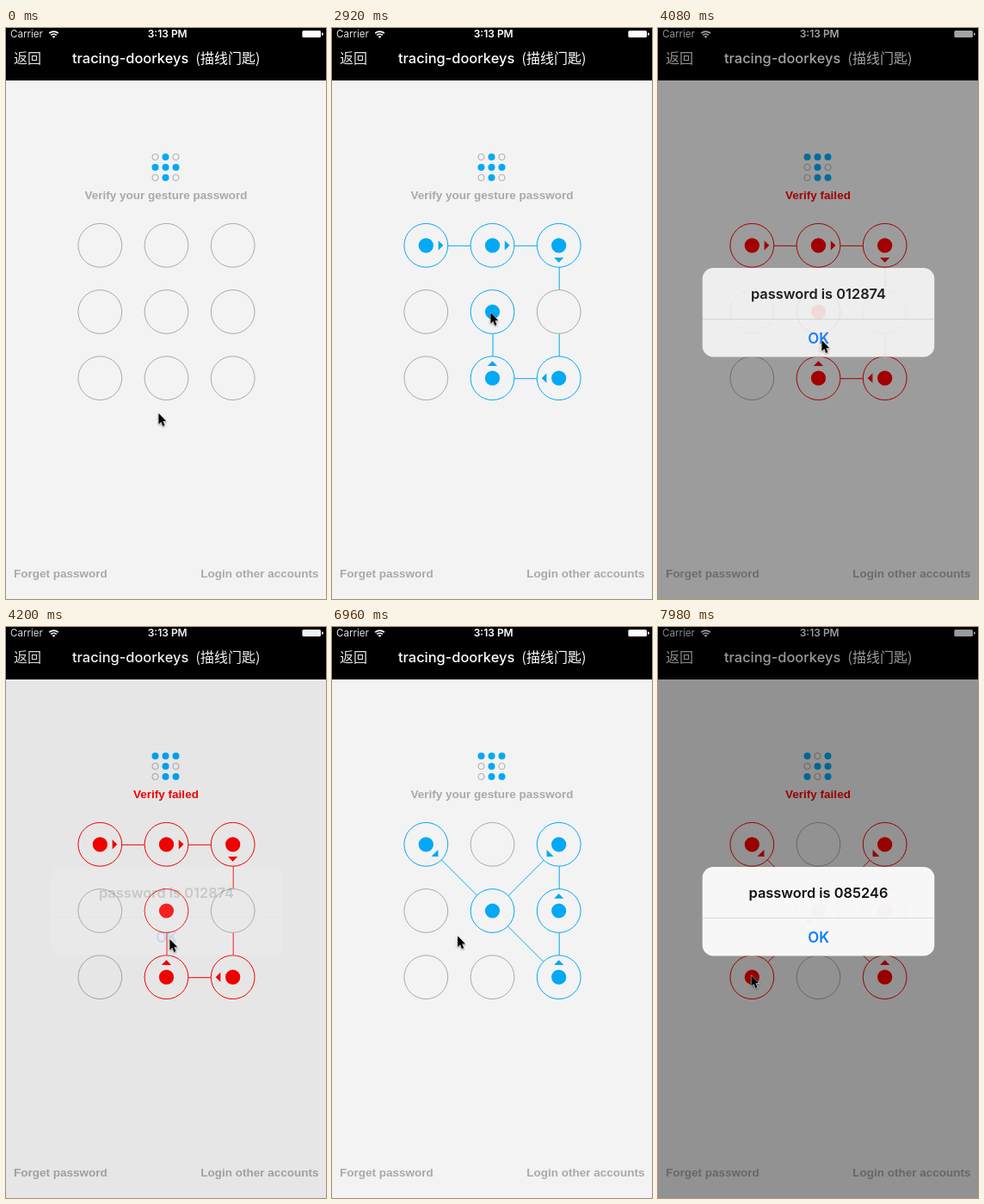
Write an HTML page that moves like this. It is 372 px wide and 664 px high and loops after 8 s.

```html
<!DOCTYPE html>
<html lang="en">
<head>
<meta charset="utf-8">
<title>Pattern lock</title>
<style>
  html, body { margin: 0; width: 100%; height: 100%; overflow: hidden; background: #f3f3f3; }
  svg { display: block; width: 372px; height: 664px; }
  text { font-family: Inter, "Noto Sans CJK SC", "Noto Sans CJK", sans-serif; fill: #fff; }
  .label { font: bold 13.5px "Liberation Sans", Arial, sans-serif; fill: #a9a9a9; }
  .mid { text-anchor: middle; }
  .bar { font-size: 16px; }
  .cjk { font-family: "Noto Sans CJK SC", "Noto Sans CJK", sans-serif; }
</style>
</head>
<body>
<svg id="stage" viewBox="0 0 372 664">
  <rect width="372" height="664" fill="#f3f3f3"/>
  <rect width="372" height="61"/>

  <text x="5" y="11.3" font-size="11.6" style="fill:#e2e2e2">Carrier</text>
  <g fill="none" stroke="#fff" stroke-width="1.7">
    <path d="M50.2 6.2a7.6 7.6 0 0 1 10.6 0M52.2 8.4a4.7 4.7 0 0 1 6.6 0"/>
    <path d="M55.5 11.8l-1.9-1.9a2.7 2.7 0 0 1 3.8 0z" fill="#fff" stroke="none"/>
  </g>
  <text class="mid" x="187.7" y="11.3" font-size="12" font-weight="600">3:13 PM</text>
  <rect x="344.4" y="3" width="21.6" height="8" rx="1.6" fill="#fff"/>
  <path d="M367 5.2q2 .4 2 1.8t-2 1.8z" fill="#fff"/>

  <text class="bar cjk" x="9" y="40.9" style="fill:#e6e6e6">返回</text>
  <text class="bar" x="77" y="40.9" font-weight="500" style="font-size:16.4px">tracing-doorkeys</text>
  <text class="bar cjk" x="220.6" y="40.9" font-weight="500">(描线门匙)</text>

  <g id="thumb"></g>
  <text id="message" class="label mid" x="186" y="199.1"></text>
  <path id="links" fill="none" transform="translate(.5 .5)"/>
  <g id="nodes"></g>
  <text class="label" x="9" y="638.6">Forget password</text>
  <text class="label" x="363.6" y="638.6" text-anchor="end">Login other accounts</text>

  <rect id="dim" width="372" height="664"/>
  <g id="alert">
    <rect x="51.7" y="279" width="269.6" height="103.5" rx="12.5" fill="#fafafa" fill-opacity=".97"/>
    <path d="M51.7 338.5h269.6" stroke="#d5d3d3" stroke-width=".8"/>
    <text id="alertText" class="mid" x="186.5" y="314.6" font-size="16.4" font-weight="600" style="fill:#111"></text>
    <text class="mid" x="186.7" y="367" font-size="16.8" font-weight="600" style="fill:#0a7cff">OK</text>
  </g>
  <g id="cursor">
    <path d="M-.6 0V12.7L2.3 10.1 4.3 14.9 6.5 14 4.5 9.3H8.3Z" stroke="#fff" stroke-linejoin="round"
          style="paint-order:stroke;filter:drop-shadow(0 1px 1px rgba(0,0,0,.4))"/>
  </g>
</svg>

<script>
const LOOP = 8000, TOUCH_LAG = 75, TOUCH_RADIUS = 25;
const BLUE = '#03a9f4', RED = '#ff0000', GREY = '#a9a9a9';
const $ = id => document.getElementById(id);

// Pointer strokes: a curve through evenly timed points, at rest in between
const strokes = [
  { from: 60, to: 530, path: [[178, 448], [112, 262]] },
  { from: 700, to: 1620, path: [[112, 262], [187, 255], [264, 256], [298, 300], [292, 360], [266, 407]] },
  { from: 2010, to: 2190, path: [[266, 407], [187, 406]] },
  { from: 2740, to: 2890, path: [[187, 406], [185, 331]] },
  { from: 3210, to: 3720, path: [[185, 331], [191, 363]] },
  { from: 4590, to: 5290, path: [[191, 363], [110, 254]] },
  { from: 5400, to: 6084, path: [[110, 254], [138, 305], [144, 360], [228, 377], [262, 400], [266, 417]] },
  { from: 6210, to: 7410, path: [[266, 417], [282, 345], [292, 290], [262, 258], [204, 312],
                                 [147, 359], [118, 392], [112, 402], [109, 405]] }
];
const attempts = [
  { press: 710, release: 3208, close: 4060, gone: 4250, reset: 5210 },
  { press: 5410, release: 7638, close: LOOP, gone: LOOP, reset: LOOP }
];
const firstThumb = [1, 3, 4, 5, 7];

function make(tag, attrs, parent) {
  const el = document.createElementNS('http://www.w3.org/2000/svg', tag);
  set(el, attrs);
  return parent.appendChild(el);
}
function set(el, attrs) {
  for (const name in attrs) el.setAttribute(name, attrs[name]);
}

const centre = i => [109.3 + (i % 3) * 77.2, 252.8 + Math.floor(i / 3) * 77.2];

const nodes = Array.from({ length: 9 }, (_, i) => {
  const g = make('g', { transform: `translate(${centre(i)})` }, $('nodes'));
  return {
    ring: make('circle', { r: 25.4, fill: '#f3f3f3' }, g),
    dot: make('circle', { r: 8.6 }, g),
    arrow: make('path', { d: 'M14.3 -5.6L20 0L14.3 5.6Z' }, g)
  };
});
const thumbs = nodes.map((_, i) => make('circle', {
  cx: 173.5 + (i % 3) * 12, cy: 150 + Math.floor(i / 3) * 12
}, $('thumb')));

// Catmull-Rom curve, with u counted in points
function curve(path, u) {
  const k = Math.min(Math.floor(u), path.length - 2), f = u - k;
  const at = i => path[Math.max(0, Math.min(path.length - 1, i))];
  const [a, b, c, d] = [at(k - 1), at(k), at(k + 1), at(k + 2)];
  return [0, 1].map(n => b[n] + f / 2 * (c[n] - a[n]
    + f * (2 * a[n] - 5 * b[n] + 4 * c[n] - d[n] + f * (3 * (b[n] - c[n]) + d[n] - a[n]))));
}

function pointerAt(t) {
  const { from, to, path } = strokes.filter(s => s.from <= t).pop() || strokes[0];
  const f = Math.max(0, Math.min(1, (t - from) / (to - from)));
  const eased = path.length === 2 ? f * f * (3 - 2 * f) : f;
  return curve(path, eased * (path.length - 1));
}
const touchAt = t => pointerAt(t - TOUCH_LAG);

// Each node is picked when the touch first reaches it
for (const attempt of attempts) {
  attempt.picks = [];
  for (let t = attempt.press; t < attempt.release; t += 5) {
    const [x, y] = touchAt(t);
    const node = nodes.findIndex((_, i) => {
      const [cx, cy] = centre(i);
      return Math.hypot(x - cx, y - cy) < TOUCH_RADIUS;
    });
    if (node >= 0 && !attempt.picks.some(p => p.node === node)) attempt.picks.push({ t, node });
  }
  attempt.code = attempt.picks.map(p => p.node);
}

// Critically damped spring, 0 to 1
function spring(ms) {
  const x = Math.max(0, ms) * 0.025;
  return 1 - (1 + x) * Math.exp(-x);
}

function drawPattern(t, attempt) {
  const active = t < attempt.reset
    ? attempt.picks.filter(p => p.t <= t).map(p => p.node) : [];
  const wrong = active.length && t >= attempt.release;
  const colour = wrong ? RED : BLUE;

  nodes.forEach(({ ring, dot, arrow }, i) => {
    const at = active.indexOf(i), on = at >= 0, next = active[at + 1];
    const pointing = on && next !== undefined;
    set(ring, { stroke: on ? colour : GREY });
    set(dot, { fill: on ? colour : 'none' });
    set(arrow, { fill: pointing ? colour : 'none' });
    if (pointing) {
      const [x, y] = centre(i), [nx, ny] = centre(next);
      set(arrow, { transform: `rotate(${Math.atan2(ny - y, nx - x) * 180 / Math.PI})` });
    }
  });

  const points = active.map(centre);
  if (active.length && !wrong) points.push(touchAt(t));
  set($('links'), { d: points.length ? 'M' + points.join('L') : '', stroke: colour });

  $('message').textContent = wrong ? 'Verify failed' : 'Verify your gesture password';
  $('message').style.fill = wrong ? RED : GREY;
}

function drawThumb(t) {
  const done = attempts.filter(a => t >= a.release).pop();
  const filled = done ? done.code : firstThumb;
  thumbs.forEach((dot, i) => {
    const on = filled.includes(i);
    set(dot, { r: on ? 4 : 3.6, fill: on ? BLUE : 'none', stroke: on ? 'none' : GREY });
  });
}

function drawAlert(t, attempt) {
  const shown = spring(t - attempt.release);
  const alpha = t < attempt.gone ? shown * (1 - spring(t - attempt.close)) : 0;
  set($('dim'), { opacity: 0.4 * alpha });
  set($('alert'), {
    opacity: alpha,
    transform: `translate(186.5 330.7) scale(${1.2 - 0.2 * shown}) translate(-186.5 -330.7)`
  });
  $('alertText').textContent = 'password is ' + attempt.code.join('');
}

function render(t) {
  const attempt = attempts[t < attempts[0].reset ? 0 : 1];
  drawPattern(t, attempt);
  drawThumb(t);
  drawAlert(t, attempt);
  set($('cursor'), { transform: `translate(${pointerAt(t)})` });
}

const start = performance.now();
function tick() {
  render((performance.now() - start) % LOOP);
  requestAnimationFrame(tick);
}
tick();
</script>
</body>
</html>
```
